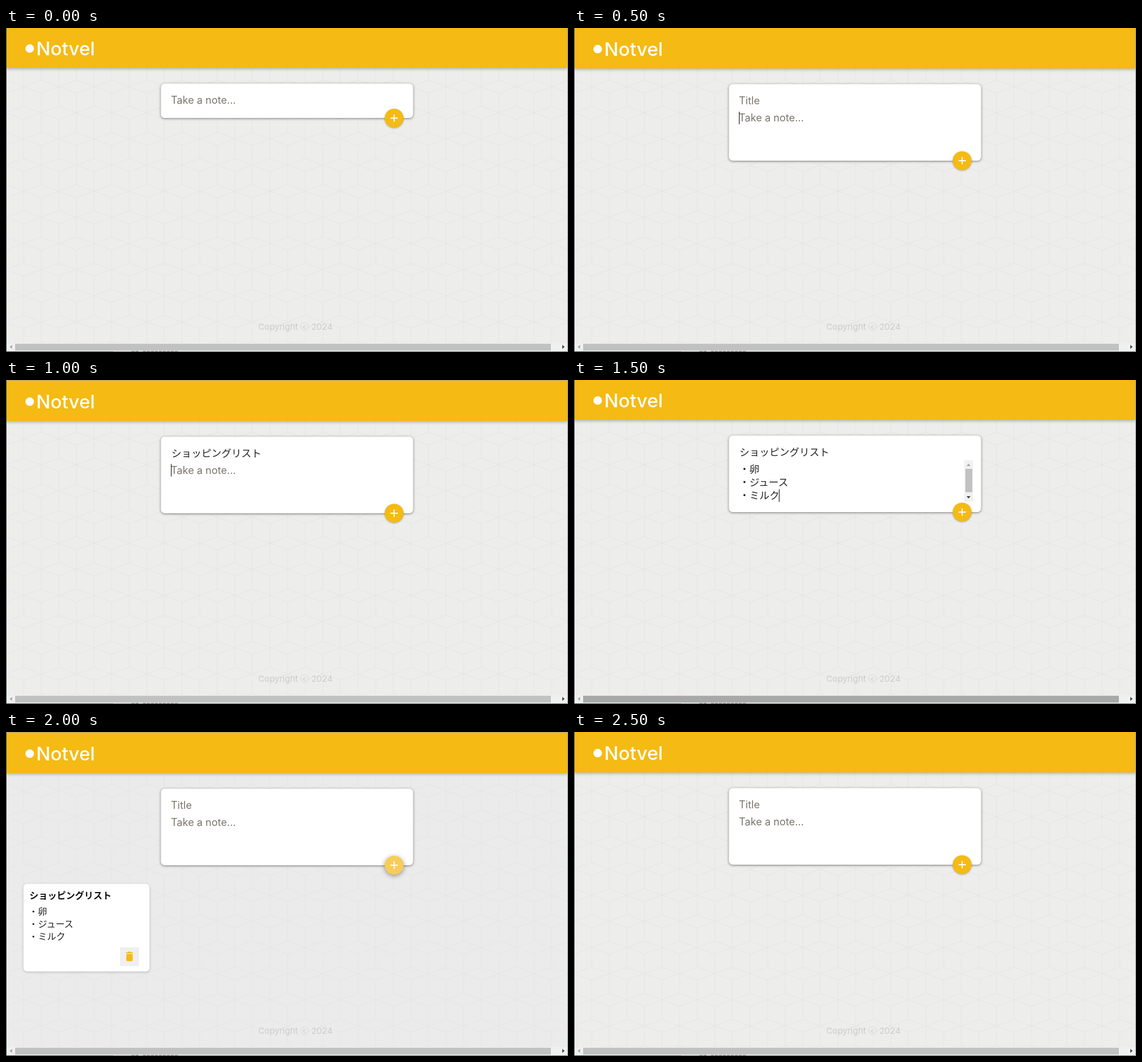
Write an HTML page that moves like this. It is 985 px wide and 569 px high and loops after 3 s.

```html
<!DOCTYPE html>
<html lang="en">
<head>
<meta charset="utf-8">
<title>Notes</title>
<style>
html, body { margin: 0; width: 100%; height: 100%; overflow: hidden; background: #ededec; }
svg { display: block; width: 985px; height: 569px; }
text { font: 18px Inter, "Noto Sans", sans-serif; white-space: pre; }
.hint { fill: #7b756d; }
.jp { font: 17.5px "Noto Sans CJK JP", "Noto Sans CJK", sans-serif; fill: #222; }
.note { font-size: 16px; }
.bold { font-weight: 700; fill: #111; }
.head { filter: drop-shadow(0 1px 3px rgba(0,0,0,.35)); }
.card { filter: drop-shadow(0 1px 2px rgba(90,90,90,.8)); }
.memo { filter: drop-shadow(0 1px 2px rgba(0,0,0,.22)); }
.add { filter: drop-shadow(0 1px 1.5px rgba(0,0,0,.3)); }
.add.down { filter: drop-shadow(0 2px 4px rgba(0,0,0,.4)); }
</style>
</head>
<body>
<svg viewBox="0 0 985 569">
  <rect id="page" width="985" height="569" fill="#ededec"/>
  <path id="cubes" fill="none" stroke="#e5e5e5"/>
  <text x="442" y="529.5" style="font-size:15px" fill="#ccc">Copyright <tspan style="font-family:'Noto Sans CJK JP',sans-serif">ⓒ</tspan> 2024</text>

  <g id="top">
    <rect class="head" y="-6" width="985" height="76" fill="#f5ba13"/>
    <circle cx="41.5" cy="36" r="7.5" fill="#fff"/>
    <text x="53" y="48" style="font-size:33px;font-weight:500" fill="#fff">Notvel</text>
    <rect id="card" class="card" x="271.5" y="97.5" width="442" rx="6.5" fill="#fff"/>
    <text id="title" x="289" y="133"></text>
    <text id="body" class="hint" x="289" y="162.5">Take a note...</text>
    <g id="list">
      <text class="jp" x="290" y="162.5">・卵</text>
      <text class="jp" x="290" y="185.5">・ジュース</text>
      <text class="jp" x="290" y="208.5">・ミルク</text>
      <path d="M684 141h15.5v73H684z" fill="#f1f1f1"/>
      <path d="M686 156h12v41h-12z" fill="#c1c1c1"/>
      <path d="M688 151h7l-3.5-4z" fill="#a3a3a3"/>
      <path d="M688 204h7l-3.5 4z" fill="#404040"/>
    </g>
    <rect id="caret" width="1.2" height="22" fill="#222"/>
    <g id="add">
      <circle id="disc" class="add" r="16.6"/>
      <path d="M-6.5 0h13M0-6.5v13" stroke="#fff" stroke-width="1.9"/>
    </g>
  </g>

  <g id="memo">
    <rect class="memo" x="30.5" y="266.5" width="221" height="154" rx="6.5" fill="#fff"/>
    <text class="jp note bold" x="41" y="293">ショッピングリスト</text>
    <text class="jp note" x="40" y="320.5">・卵</text>
    <text class="jp note" x="40" y="342.5">・ジュース</text>
    <text class="jp note" x="40" y="364.5">・ミルク</text>
    <path d="M200 378h33v33h-33z" fill="#efefef"/>
    <path d="M211 390h11v10.5q0 2-2 2h-7q-2 0-2-2zM210 387h3.3l1-1.2h4l1 1.2h3.3v1.8H210z" fill="#f5ba13"/>
  </g>

  <path d="M1 553h983v15H1z" fill="#f0f0f0"/>
  <path id="thumb" d="M16 554.5h939v12H16z"/>
  <path d="M10.5 556.5v7l-4-3.5z" fill="#a3a3a3"/>
  <path d="M975 556.5v7l4-3.5z" fill="#404040"/>
  <path d="M0 568.5h985" stroke="#56625f"/>
  <path d="M0 568.5h188" stroke="#173f3a"/>
  <path d="M220 568h12m8 0h62" stroke="#4a5553" stroke-dasharray="5 2"/>
  <path d="M.5 0v569" stroke="#344a4c"/>
  <path d="M984.5 0v569" stroke="#8f9494"/>
  <path id="edge" d="M0 .5h985" stroke="#a3aaa0"/>
</svg>
<script>
const $ = id => document.getElementById(id);
const STEP = 500;
const SHOPPING = "ショッピングリスト";

// shift: vertical page offset; caret: position inside the form
const steps = [
  { shift: 0, title: "", open: false },
  { shift: 1, title: "Title", open: true, caret: [289, 146] },
  { shift: 2, title: SHOPPING, open: true, caret: [289, 145.5] },
  { shift: 0, title: SHOPPING, open: true, list: true, caret: [359, 192] },
  { shift: 2, title: "Title", open: true, memo: true },
  { shift: 1, title: "Title", open: true }
];

function drawCubes() {
  const half = 30.85, rise = 11.5, row = 45.9;
  let d = "";
  for (let r = -1; r < 11; r++) {
    const y = 91.5 + r * row;
    for (let x = (r & 1 ? 0 : half) - half; x < 1020; x += 2 * half) {
      d += `M${x} ${y}l${half} ${rise}l${-half} ${rise}l${-half} ${-rise}z` +
           `m0 ${2 * rise}v${row - rise}M${x + half} ${y + rise}V${y + row}`;
    }
  }
  $("cubes").setAttribute("d", d);
}

const show = (id, on) => $(id).style.display = on ? "" : "none";

function render(s) {
  $("top").setAttribute("transform", `translate(0 ${s.shift})`);
  $("card").setAttribute("height", s.open ? 134.5 : 60.5);
  $("title").textContent = s.title;
  $("title").setAttribute("class", s.title === SHOPPING ? "jp" : "hint");
  $("title").setAttribute("x", s.title === SHOPPING ? 290 : 289);
  $("body").setAttribute("y", s.open ? 162.5 : 133);
  show("body", !s.list);
  show("list", s.list);
  show("memo", s.memo);
  show("caret", s.caret);
  if (s.caret) {
    $("caret").setAttribute("x", s.caret[0]);
    $("caret").setAttribute("y", s.caret[1]);
  }
  $("add").setAttribute("transform", `translate(680.3 ${s.open ? 232 : 158.3})`);
  $("disc").setAttribute("fill", s.memo ? "#f8cc58" : "#f5ba13");
  $("disc").setAttribute("class", s.memo ? "add down" : "add");
  $("thumb").setAttribute("fill", s.list ? "#a8a8a8" : "#c1c1c1");
  $("page").setAttribute("fill", s.memo ? "#ebebeb" : "#ededec");
  show("edge", s.shift === 2);
}

drawCubes();
render(steps[0]);
let last = 0;
const start = performance.now();
function tick(now) {
  const i = Math.floor(Math.max(0, now - start) / STEP) % steps.length;
  if (i !== last) render(steps[last = i]);
  requestAnimationFrame(tick);
}
requestAnimationFrame(tick);
</script>
</body>
</html>
```
